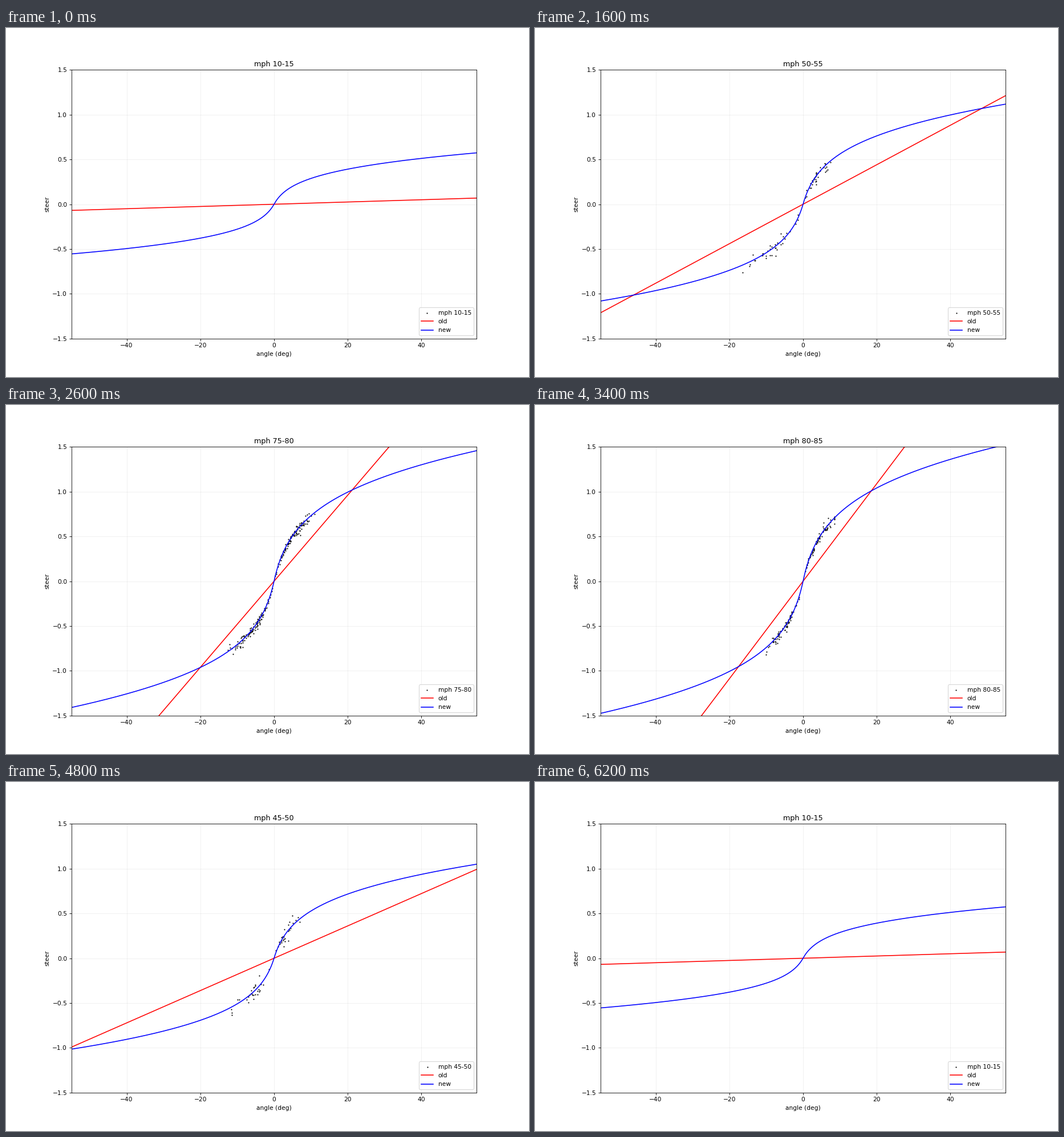
Animation, 917 px wide and 611 px high, one loop 6.4 s. Source, as a matplotlib script:

```python
import numpy as np
import matplotlib.pyplot as plt
from matplotlib.animation import FuncAnimation

FRAMES, INTERVAL = 32, 200
ANGLES = np.linspace(-55, 55, 1101)

# How the sample cloud grows and shrinks with speed
SPEEDS = [15, 30, 50, 60, 75, 90]
COUNT = [0, 26, 68, 185, 205, 40]
REACH_LEFT = [0, 1.5, 18, 14, 13, 8]
REACH_RIGHT = [0, 3.6, 8.5, 14, 11.5, 8]


def old_steer(angle, mph):
    return 8e-6 * mph ** 2 * angle


def new_steer(angle, mph):
    x = 0.306 * angle
    gain = 0.00583 * (mph + 29.7) * np.where(angle < 0, 0.967, 1)
    return gain * x / (1 + np.abs(x)) ** 0.686


def samples(low):
    rng = np.random.default_rng(low)
    count, left, right = (np.interp(low, SPEEDS, row)
                          for row in (COUNT, REACH_LEFT, REACH_RIGHT))
    if count < 1:
        return np.empty((0, 2))
    half = int(count / 2)
    angle = np.concatenate([
        rng.triangular(-left, -0.4 * left, 0, half),
        rng.triangular(0, 0.35 * right, right, half),
    ])
    # Readings fall close to half degrees
    angle = np.round(angle * 2) / 2 + rng.normal(0, 0.08, angle.size)
    spread = (0.008 + 0.025 * np.minimum(np.abs(angle) / 6, 1)
              + 0.002 * max(0, 55 - low))
    steer = new_steer(angle, low + 2.5) + rng.normal(-0.3, 1, angle.size) * spread
    return np.column_stack([angle, steer])


fig, ax = plt.subplots(figsize=(12.003, 7.998), dpi=76.4)
dots = ax.scatter([], [], s=1, color="black")
old_line, = ax.plot([], [], color="red")
new_line, = ax.plot([], [], color="blue")
ax.set(xlim=(-55, 55), ylim=(-1.5, 1.5), xlabel="angle (deg)", ylabel="steer")
ax.grid(alpha=0.2)
title = ax.set_title("mph 10-15")
legend = ax.legend([dots, old_line, new_line], ["mph 10-15", "old", "new"],
                   loc="lower right")


def update(frame):
    low = 10 + 5 * min(frame, FRAMES - 1 - frame)
    mph = low + 2.5
    label = f"mph {low}-{low + 5}"
    title.set_text(label)
    legend.get_texts()[0].set_text(label)
    dots.set_offsets(samples(low))
    old_line.set_data(ANGLES, old_steer(ANGLES, mph))
    new_line.set_data(ANGLES, new_steer(ANGLES, mph))
    return dots, old_line, new_line, title, legend


anim = FuncAnimation(fig, update, frames=FRAMES, interval=INTERVAL,
                     repeat=True, repeat_delay=0)
plt.show()
```
